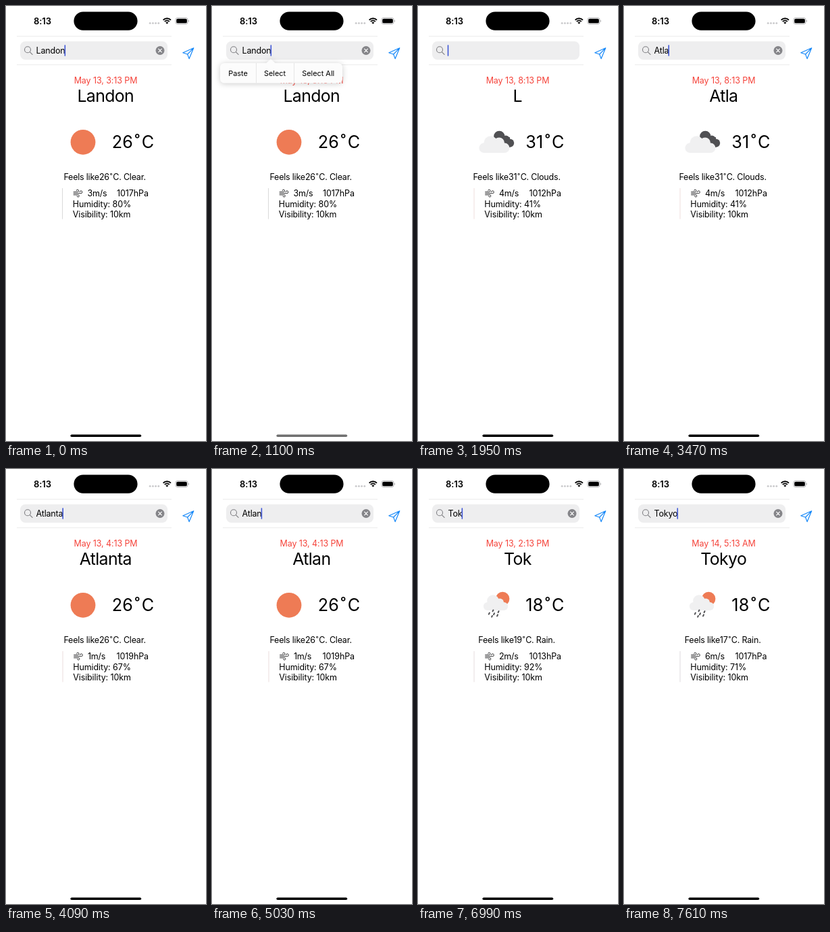
Recreate the animation shown at these times as an HTML page. Size 296x640 px, loop 8 s.

```html
<!DOCTYPE html>
<html lang="en">
<head>
<meta charset="utf-8">
<title>Weather search</title>
<style>
html, body { margin: 0; width: 100%; height: 100%; overflow: hidden; background: #fff; }
svg { display: block; width: 296px; height: 640px; }
text { font: 12.5px Inter, "Open Sans", sans-serif; letter-spacing: -.1px; white-space: pre; }
.mid { text-anchor: middle; }
.big { font-size: 24.8px; letter-spacing: -.6px; }
.temp { font-size: 25.2px; letter-spacing: .2px; }
.clock { font-size: 13px; font-weight: 600; }
.tight { letter-spacing: -.2px; }
.menu text { font-size: 10.9px; letter-spacing: 0; }
.line { fill: none; stroke-linecap: round; stroke-linejoin: round; }
#menu { filter: drop-shadow(0 1px 4px rgba(0, 0, 0, .2)); }
</style>
</head>
<body>
<svg viewBox="0 0 296 640">
  <!-- status bar -->
  <text class="clock mid" x="54" y="26.6">8:13</text>
  <rect x="100.4" y="8.4" width="94.2" height="27.4" rx="13.7"/>
  <g fill="#c8c8ca">
    <circle cx="213.2" cy="25.3" r="1.4"/><circle cx="217.4" cy="25.3" r="1.4"/>
    <circle cx="221.6" cy="25.3" r="1.4"/><circle cx="225.8" cy="25.3" r="1.4"/>
  </g>
  <g class="line" stroke="#000" stroke-width="1.9" style="stroke-linecap:butt">
    <path d="M232.6 20.6a8 8 0 0 1 11.4 0M234.8 22.9a5 5 0 0 1 7 0"/>
  </g>
  <path d="M238.3 26.4l-2-2a2.9 2.9 0 0 1 4 0z"/>
  <rect x="250.9" y="17.4" width="18.2" height="9.2" rx="3" fill="none" stroke="#a4a4a6" stroke-width=".8"/>
  <rect x="252.2" y="18.7" width="15.6" height="6.6" rx="1.9"/>
  <path d="M270.1 20.4a1.8 1.8 0 0 1 0 3.2z" fill="#a4a4a6"/>

  <!-- search bar -->
  <path d="M16 44.5H245M16 86.5H245" stroke="#ececec"/>
  <rect x="21" y="52" width="218" height="27" rx="7.5" fill="#eeeeef"/>
  <g class="line" stroke="#808084" stroke-width="1.1">
    <circle cx="32" cy="64.3" r="4.5"/><path d="M35.3 67.6l3.8 3.8"/>
  </g>
  <text id="query" class="tight" x="44.6" y="70"></text>
  <rect id="caret" y="57.3" width="1.6" height="16.4" rx=".7" fill="#3f57d6"/>
  <g id="clear">
    <circle cx="228" cy="65.5" r="6.5" fill="#858589"/>
    <path class="line" d="M225.7 63.2l4.6 4.6m0-4.6l-4.6 4.6" stroke="#fff" stroke-width="1.2"/>
  </g>
  <path class="line" d="M277.7 61.8L261.8 68.7l6.8 2.3 2.5 6.6zL268.6 71" stroke="#1688f8" stroke-width="1.2"/>

  <!-- forecast -->
  <text id="date" class="mid" x="147.5" y="113.8" fill="#f5433a"></text>
  <text id="title" class="mid big" x="147.3" y="141.3"></text>
  <g id="clear-sky"><circle cx="114" cy="200.3" r="18.4" fill="#ee7b55"/></g>
  <g id="clouds">
    <g fill="#505053">
      <circle cx="120.3" cy="191.8" r="8.1"/><circle cx="130" cy="196" r="5.5"/>
      <circle cx="136" cy="201.6" r="6.2"/><rect x="115" y="193" width="21" height="14.8"/>
    </g>
    <g fill="#f0f0f1">
      <circle cx="97.7" cy="208.8" r="7.3"/><circle cx="107.5" cy="201.2" r="10"/>
      <circle cx="120" cy="201.4" r="8"/><circle cx="128.2" cy="208.8" r="7.2"/>
      <rect x="97.7" y="203" width="30.5" height="13.1"/>
    </g>
  </g>
  <g id="rain">
    <circle cx="125.2" cy="191" r="10.2" fill="#ee7b55"/>
    <g fill="#f0f0f1">
      <circle cx="102.8" cy="202" r="6"/><circle cx="111" cy="194" r="8.8"/>
      <circle cx="121" cy="196.5" r="6"/><circle cx="127.2" cy="202" r="6"/>
      <rect x="102.8" y="196" width="24.4" height="12"/>
    </g>
    <path class="line" d="M111.4 207.6l-.9 1.8M119.5 209.2l-.9 1.8M105.8 211.6l-1 2M113 212.2l-1 2M118 214.4l-1 2M109.9 216l-.8 1.6" stroke="#515154" stroke-width="2"/>
  </g>
  <text class="mid temp" x="188" y="209.2"><tspan id="temp"></tspan><tspan dx="2.4">˚</tspan><tspan dx="2.4">C</tspan></text>
  <text class="mid tight" x="146.1" y="255.8">Feels like<tspan id="feels"></tspan><tspan dx=".9">˚</tspan><tspan dx=".9">C. </tspan><tspan id="sky"></tspan></text>
  <g id="details">
    <path id="rule" d="M83 268V313.5"/>
    <path class="line" d="M99.6 273.6h5.7a1.7 1.7 0 1 0-1.7-1.8M99.6 275.7h10.8a1.9 1.9 0 1 0-1.9-2M99.6 277.8h6.6a1.6 1.6 0 1 1-1.6 1.8" stroke="#2a2a2c" stroke-width=".95"/>
    <text id="wind" class="tight" x="119.9" y="280.1"></text>
    <text id="humidity" x="98.2" y="295.6"></text>
    <text x="98.2" y="311.1">Visibility: 10km</text>
  </g>
  <text id="pressure" y="280.1"></text>

  <!-- edit menu -->
  <g id="menu" class="menu">
    <path d="M18 84H80.5L87 78l6.5 6H187a6 6 0 0 1 6 6v17.5a6 6 0 0 1-6 6H18a6 6 0 0 1-6-6V90a6 6 0 0 1 6-6z" fill="#fcfcfc"/>
    <path d="M65.5 84v29.5M121.5 84v29.5" stroke="#e6e6e6"/>
    <text class="mid" x="38.5" y="103">Paste</text>
    <text class="mid" x="93" y="103">Select</text>
    <text class="mid" x="157.2" y="103">Select All</text>
  </g>
  <rect id="home" x="95.4" y="630.4" width="104.8" height="3.5" rx="1.75"/>
</svg>
<script>
const LOOP = 8000;
const $ = id => document.getElementById(id);
const ramp = (t, a, b) => Math.min(1, Math.max(0, (t - a) / (b - a)));

const london = { date: "May 13, 3:13 PM", icon: "clear-sky", temp: 26, feels: 26, sky: "Clear.",
  wind: 3, pressure: 1017, humidity: 80, rule: "#d9d9da", dx: .5 };
const cloudy = { date: "May 13, 8:13 PM", icon: "clouds", temp: 31, feels: 31, sky: "Clouds.",
  wind: 4, pressure: 1012, humidity: 41, rule: "#f0dfdc", dx: 0 };
const atlanta = { date: "May 13, 4:13 PM", icon: "clear-sky", temp: 26, feels: 26, sky: "Clear.",
  wind: 1, pressure: 1019, humidity: 67, rule: "#eadcdd", dx: 1 };
const shower = { date: "May 13, 2:13 PM", icon: "rain", temp: 18, feels: 19, sky: "Rain.",
  wind: 2, pressure: 1013, humidity: 92, rule: "#e6dcde", dx: 0 };
const tokyo = { date: "May 14, 5:13 AM", icon: "rain", temp: 18, feels: 17, sky: "Rain.",
  wind: 6, pressure: 1017, humidity: 71, rule: "#dddadd", dx: 0 };

const typed = [
  [0, "Landon"], [1450, "Lando"], [1620, "Lan"], [1780, "L"], [1950, ""],
  [2980, "A"], [3320, "At"], [3470, "Atla"], [3620, "Atlan"], [3780, "Atlant"], [3930, "Atlanta"],
  [4720, "Atlant"], [5030, "Atlan"], [5190, "Atl"], [5340, "At"], [5640, "A"], [6270, ""],
  [6570, "T"], [6720, "To"], [6990, "Tok"], [7130, "Toky"], [7300, "Tokyo"]
];
const weather = [[0, london], [1780, cloudy], [4090, atlanta], [5500, cloudy], [6990, shower], [7610, tokyo]];

const indexAt = (list, t) => list.findLastIndex(([start]) => start <= t);

function showText(i) {
  const word = typed[i][1];
  $("query").textContent = word;
  // an empty query keeps the last searched title
  $("title").textContent = word || typed[i - 1][1];
  $("caret").setAttribute("x", 43.7 + (word ? $("query").getComputedTextLength() : 0));
  $("clear").style.display = word ? "" : "none";
}

function showWeather(w) {
  for (const id of ["date", "temp", "feels", "sky"]) $(id).textContent = w[id];
  $("wind").textContent = w.wind + "m/s";
  $("pressure").textContent = w.pressure + "hPa";
  $("pressure").setAttribute("x", 164.5 - w.dx);
  $("humidity").textContent = `Humidity: ${w.humidity}%`;
  $("rule").setAttribute("stroke", w.rule);
  $("details").setAttribute("transform", `translate(${w.dx} 0)`);
  for (const id of ["clear-sky", "clouds", "rain"])
    $(id).style.display = id === w.icon ? "" : "none";
}

let lastText = -1, lastWeather = -1;
function draw() {
  const t = performance.now() % LOOP;
  const i = indexAt(typed, t), j = indexAt(weather, t);
  if (i !== lastText) showText(lastText = i);
  if (j !== lastWeather) showWeather(weather[lastWeather = j][1]);
  $("caret").style.visibility = t >= 2580 && t < 2980 ? "hidden" : "visible";
  $("menu").style.opacity = ramp(t, 330, 600) * (1 - ramp(t, 1210, 1330));
  const grey = Math.round(112 * ramp(t, 770, 1100) * (1 - ramp(t, 1450, 1780)));
  $("home").setAttribute("fill", `rgb(${grey},${grey},${grey})`);
  requestAnimationFrame(draw);
}
draw();
</script>
</body>
</html>
```
